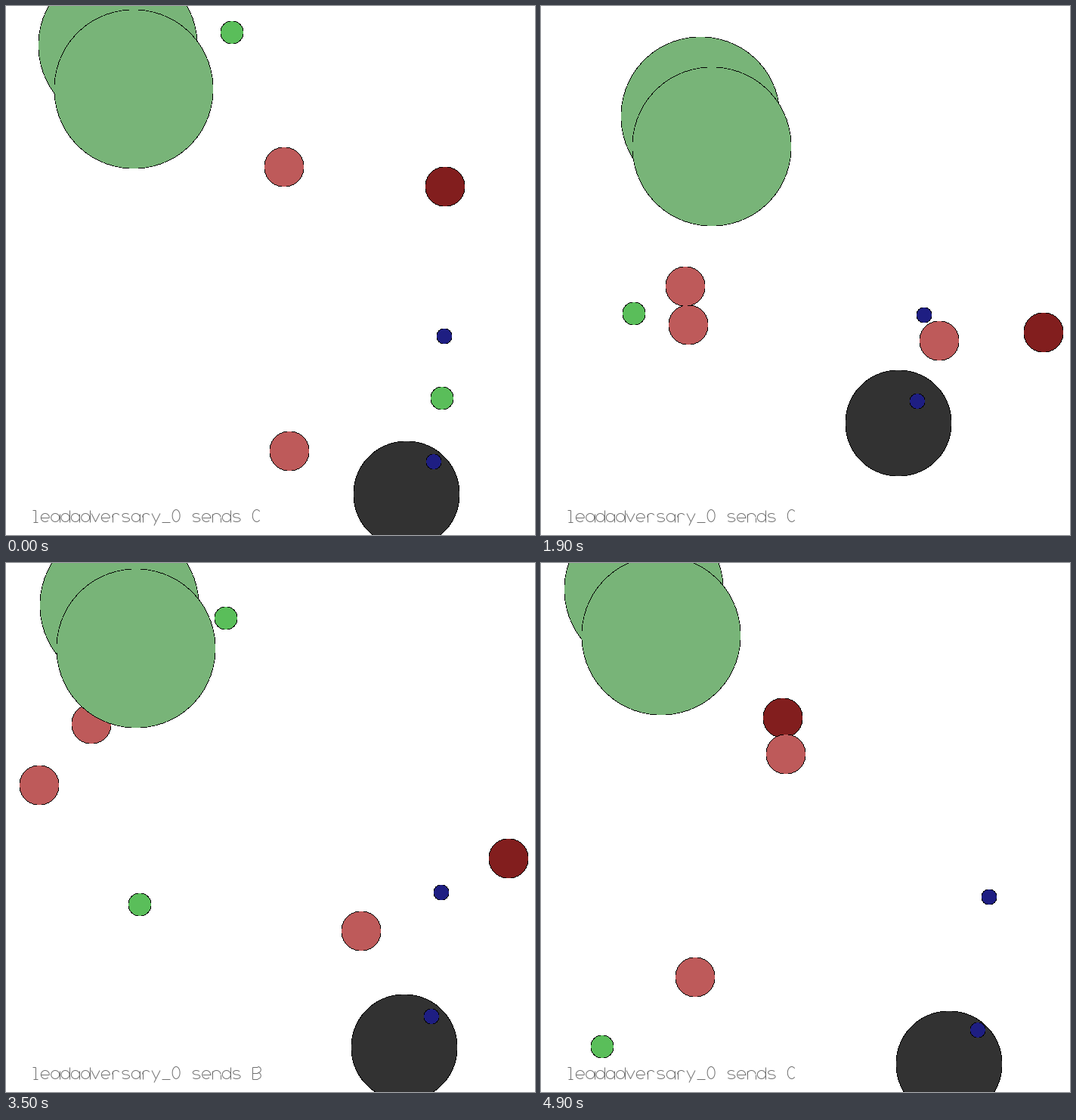
These frames come from a looping animation (700 by 700 pixels, 5000 ms). A matplotlib script:

```python
import numpy as np
import matplotlib.pyplot as plt
from matplotlib.animation import FuncAnimation
from matplotlib.collections import LineCollection
from matplotlib.patches import Circle

SIZE, DPI = 700, 100
CENTER, REACH = SIZE / 2, 315
FRAMES, INTERVAL = 50, 100
PIXEL = 72 / DPI

RED = (190, 90, 90)
DARK_RED = (130, 30, 30)
GREEN = (90, 190, 90)
FOREST = (120, 180, 120)
FOOD = (30, 30, 130)
ROCK = (50, 50, 50)

# World coordinates are measured from the centre of the stage.
WOODS = (-190.95, -253.4)
BOULDER = (190.9, 313.04)
WAYPOINT_FRAMES = np.array([0, 6, 13, 25, 31, 39, 49])

fig = plt.figure(figsize=(SIZE / DPI, SIZE / DPI), dpi=DPI, facecolor="white")
ax = fig.add_axes([0, 0, 1, 1])
ax.set(xlim=(0, SIZE), ylim=(SIZE, 0))
ax.axis("off")


def smooth(values):
    """Cubic Hermite curve through one value per waypoint, for every frame."""
    t, p = WAYPOINT_FRAMES, np.array(values, float)
    slope = np.gradient(p, t)
    frames = np.arange(FRAMES)
    i = np.clip(np.searchsorted(t, frames, side="right") - 1, 0, len(t) - 2)
    h = t[i + 1] - t[i]
    u = (frames - t[i]) / h
    ease = u * u * (3 - 2 * u)
    return (p[i] + ease * (p[i + 1] - p[i])
            + h * u * (1 - u) * ((1 - u) * slope[i] - u * slope[i + 1]))


tracks, discs = [], []


def add_disc(color, radius, track):
    """A black disc under a slightly smaller one leaves a crisp outline."""
    pair = [Circle((0, 0), r, facecolor=c, linewidth=0, antialiased=False,
                   zorder=1)
            for r, c in ((radius, "black"),
                         (radius - 0.9, np.array(color) / 255))]
    for patch in pair:
        ax.add_patch(patch)
    tracks.append(track)
    discs.append(pair)


def add_agent(color, radius, *waypoints):
    add_disc(color, radius, np.column_stack([smooth(v) for v in zip(*waypoints)]))


def add_landmark(color, radius, spot):
    add_disc(color, radius, np.tile(spot, (FRAMES, 1)))


add_agent(DARK_RED, 26, (245, -117), (230, -88), (415, -22), (481, 228),
          (400, 140), (261, -49), (-30, -145))
add_agent(RED, 26, (20, -144), (-35, -183), (-117, -14), (-340, 127.5),
          (-352, -67), (-290, -33), WOODS)
add_agent(RED, 26, WOODS, (-105, -200), (-138, -80), (-344, 54),
          (-348.6, -122.5), (-142, -134), (-26, -97))
add_agent(RED, 26, (27, 253), (168, 243), (164, 146), (350.5, 170),
          (247, 169.5), (9, 130), (-146, 198))
add_agent(GREEN, 15, (-53, -333), WOODS, (-276, 15), (-349, 5), WOODS,
          (24, -288), WOODS)
add_agent(GREEN, 15, (240, 179), (265, 203), BOULDER, BOULDER, (-27, 110),
          (-308, 162), (-269, 290))

add_landmark(ROCK, 70, BOULDER)
add_landmark(FOOD, 10, (243.3, 92.5))
add_landmark(FOOD, 10, (228.8, 268.3))
add_landmark(FOREST, 105, (-213.5, -REACH))
add_landmark(FOREST, 105, WOODS)

world = np.array(tracks)
# The camera zooms out so that the farthest thing stays in view.
zoom = REACH / np.maximum(np.abs(world).max(axis=(0, 2)), REACH)
screen = np.floor(CENTER + world * zoom[:, None] + 1e-6)


def arc(cx, cy, rx, ry, start=0, end=360):
    a = np.radians(np.linspace(start, end, 25))
    return np.column_stack([cx + rx * np.cos(a), cy + ry * np.sin(a)])


def stem(x, top):
    return [(x, 0), (x, top)]


def bar(y, left=0, right=11):
    return [(left, y), (right, y)]


# Single-stroke letters, y up from the baseline.
WIDTH, LOW, CAP, MID = 11, 11, 16, 5.5
BOWL = arc(MID, MID, MID, MID)
GLYPHS = {
    " ": [],
    "_": [bar(0)],
    "0": [arc(MID, CAP / 2, 5, CAP / 2)],
    "l": [stem(6, CAP), bar(CAP, 2, 6), bar(0, 3, 9)],
    "e": [bar(MID), arc(MID, MID, MID, MID, 0, 315)],
    "a": [BOWL, stem(WIDTH, LOW)],
    "d": [BOWL, stem(WIDTH, CAP)],
    "v": [[(0, LOW), (MID, 0), (WIDTH, LOW)]],
    "y": [[(0, LOW), (MID, 0)], [(WIDTH, LOW), (3, -5)]],
    "r": [stem(1, LOW), arc(6, 6, 5, 5, 180, 35)],
    "n": [stem(0, LOW), arc(MID, 6, MID, 5, 180, 0), stem(WIDTH, 6)],
    "s": [arc(MID, 8.25, 4.5, 2.75, 30, 270), arc(MID, 2.75, 5, 2.75, 90, -150)],
    "A": [[(0, 0), (MID, CAP), (WIDTH, 0)], bar(5, 2, 9)],
    "B": [stem(0, CAP), arc(7, 12, 4, 4, 90, -90), arc(7, 4, 4, 4, 90, -90),
          *(bar(y, 0, 7) for y in (0, CAP / 2, CAP))],
    "C": [arc(MID, CAP / 2, MID, CAP / 2, 45, 315)],
}
TEXT_X, BASELINE, ADVANCE = 33, 682.5, 13.33


def strokes(text):
    return [np.array(line) * (1, -1) + (TEXT_X + i * ADVANCE, BASELINE)
            for i, char in enumerate(text) for line in GLYPHS[char]]


caption = ax.add_collection(
    LineCollection([], colors="#707070", linewidths=PIXEL, zorder=2),
    autolim=False)


def message(frame):
    if 25 <= frame < 29:
        return "A"
    if 4 <= frame < 13 or 34 <= frame < 37:
        return "B"
    return "C"


def draw(frame):
    for pair, track in zip(discs, screen):
        for patch in pair:
            patch.center = track[frame]
    caption.set_segments(strokes("leadadversary_0 sends " + message(frame)))
    return [*sum(discs, []), caption]


anim = FuncAnimation(fig, draw, frames=FRAMES, interval=INTERVAL,
                     repeat=True, repeat_delay=0)
plt.show()
```
